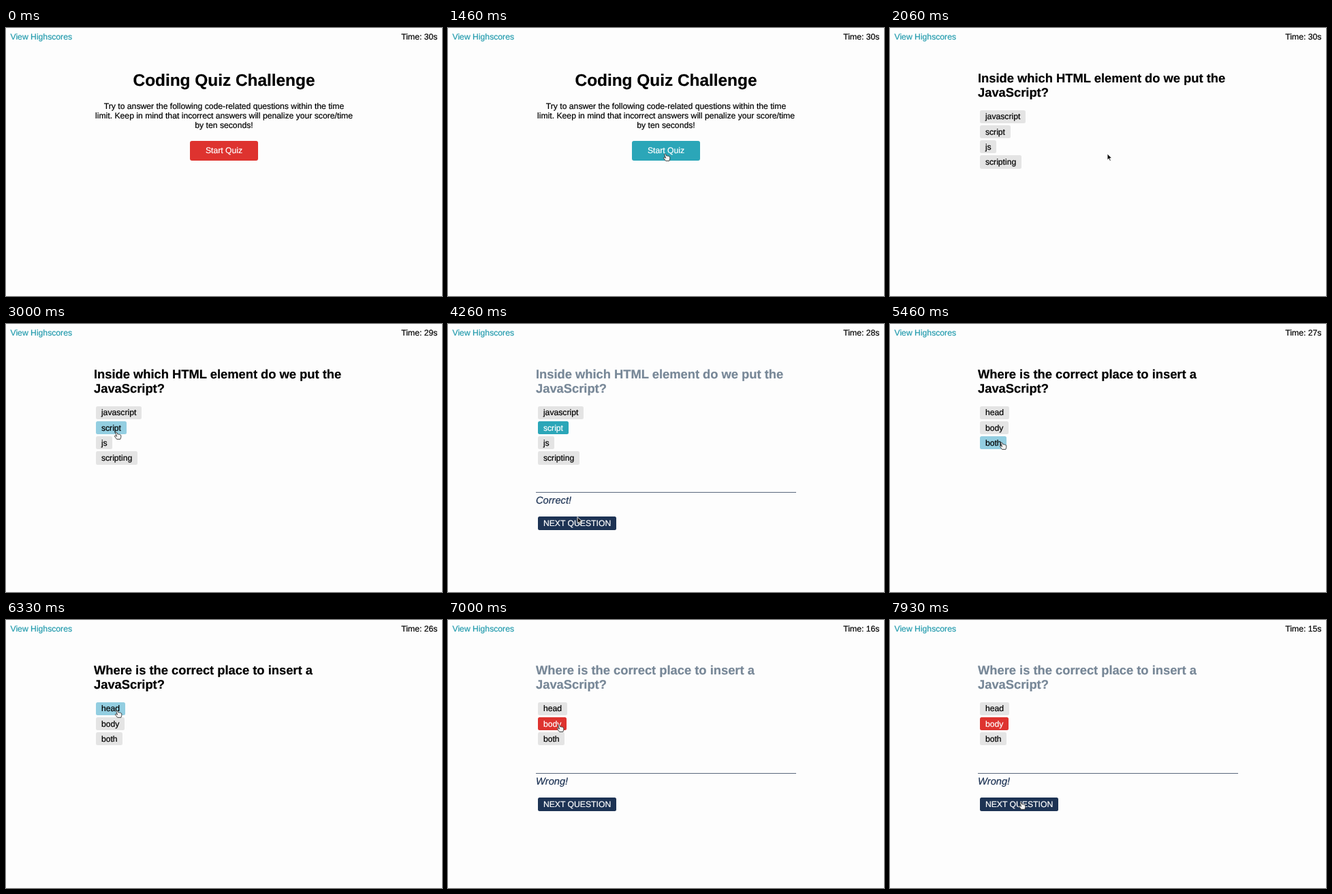
Write an HTML page that moves like this. It is 640x394 px and loops after 8 s.

```html
<!DOCTYPE html>
<html lang="en">
<head>
<meta charset="utf-8">
<title>Coding Quiz Challenge</title>
<style>
:root { --teal: #2ba6b8; --red: #de332f; --navy: #1d3354; --hover: #93cee1; }
html, body { margin: 0; width: 100%; height: 100%; overflow: hidden; }
body {
  position: relative; background: #fdfdfd; color: #000;
  font: 12.2px/14px "Liberation Sans", Arial, sans-serif; white-space: nowrap;
  text-rendering: geometricPrecision; -webkit-text-stroke: .22px;
}
/* every animation shares one 8 s clock and switches hard unless told otherwise */
.anim { animation: 8s step-end infinite; }
.scene, .link, .timer, .cursor, h1, h2, .intro, .start, .options, .feedback { position: absolute; margin: 0; }
.scene { inset: 0; }
.link, .timer { top: 6px; transform: translateY(.4px); }
.link { left: 6.5px; color: #259cae; }
.timer { left: 580.3px; height: 14px; overflow: hidden; }
.timer div { animation-name: countdown; }

h1 { left: 0; width: 640px; top: 64px; font-size: 24.4px; line-height: 27px; text-align: center; }
.intro { left: 0; width: 640px; top: 108px; text-align: center; }
.start {
  left: 270px; top: 165.6px; width: 100px; height: 29px; line-height: 29px; border-radius: 3px;
  text-align: center; color: #fff; background: var(--red); animation-name: start-hover;
}
h2 { left: 129px; top: 63px; font-size: 18.34px; line-height: 21px; }
.options { left: 132.3px; top: 120.8px; }
.btn { display: block; width: max-content; padding: 2.6px 7.6px; margin-bottom: 3px; border-radius: 2.5px; background: #e4e4e4; }
.feedback { left: 129px; top: 247px; width: 382px; border-top: 1px solid #59677c; color: var(--navy); }
.feedback i { display: block; margin: 4.4px 0 14px; font-size: 14.64px; line-height: 17px; }
.feedback .btn { margin-left: 3.3px; color: #fff; background: var(--navy); }
#second .feedback { top: 225px; }

#intro { animation-name: intro; }
#first, #second, .feedback { opacity: 0; }
#first { animation-name: first; }
#second { animation-name: second; }
#first h2 { animation-name: first-dim; }
#second h2 { animation-name: second-dim; }
#first .feedback { animation-name: first-answer; }
#second .feedback { animation-name: second-answer; }
.script { animation-name: script; }
.head { animation-name: head; }
.body { animation-name: body; }
.both { animation-name: both; }

.cursor { left: 0; top: 0; width: 16px; height: 18px; overflow: visible; --hand: 0; opacity: 0;
  animation: path 8s ease-in-out infinite, hand 8s step-end infinite, appear 8s step-end infinite; }
.cursor path { stroke-linejoin: round; stroke-linecap: round; }
.arrow { opacity: calc(1 - var(--hand)); fill: #111; stroke: #fff; stroke-width: .9; }
.pointer { opacity: var(--hand); fill: #f2f2f2; stroke: #333; stroke-width: .9; }

@keyframes intro { 23.4%, 100% { opacity: 0; } }
@keyframes first { 23.4% { opacity: 1; } 55.9% { opacity: 0; } }
@keyframes second { 55.9%, 100% { opacity: 1; } }
@keyframes first-dim { 45%, 100% { color: #778797; } }
@keyframes second-dim { 83.75%, 100% { color: #778797; } }
@keyframes first-answer { 45%, 100% { opacity: 1; } }
@keyframes second-answer { 83.75%, 100% { opacity: 1; } }
@keyframes start-hover { 15.3%, 100% { background: var(--teal); } }
@keyframes script {
  34.75% { background: var(--hover); }
  45%, 100% { background: var(--teal); color: #fff; }
}
@keyframes both { 64.8% { background: var(--hover); } 70.3% { background: #e4e4e4; } }
@keyframes head { 72.4% { background: var(--hover); } 80.6% { background: #e4e4e4; } }
@keyframes body {
  70.6% { background: var(--hover); }
  72.1% { background: #e4e4e4; }
  81% { background: var(--hover); }
  83.75%, 100% { background: var(--red); color: #fff; }
}
@keyframes countdown {
  0% { transform: none; }
  35.6% { transform: translateY(-14px); }
  48.4% { transform: translateY(-28px); }
  64.6% { transform: translateY(-42px); }
  76.9% { transform: translateY(-56px); }
  83.75% { transform: translateY(-70px); }
  89.4%, 100% { transform: translateY(-84px); }
}
@keyframes appear { 12.5%, 100% { opacity: 1; } }
@keyframes path {
  0%, 12.5% { transform: translate(369px, 231px); }
  16.6%, 28.75% { transform: translate(319px, 185px); }
  36.25%, 46.5% { transform: translate(162px, 159px); }
  52.25%, 56% { transform: translate(190px, 284px); }
  58.5%, 60.75% { transform: translate(188px, 287px); }
  65.4%, 68.75% { transform: translate(164px, 174px); }
  73.75%, 80% { transform: translate(163px, 133px); }
  82%, 88.75% { transform: translate(163px, 154px); }
  95.6%, 100% { transform: translate(192px, 268px); }
}
@keyframes hand {
  0% { --hand: 0; }
  15.3% { --hand: 1; }
  23.4% { --hand: 0; }
  34.75% { --hand: 1; }
  47.5% { --hand: 0; }
  54% { --hand: 1; }
  55.9% { --hand: 0; }
  64.8% { --hand: 1; }
  90% { --hand: 0; }
  95%, 100% { --hand: 1; }
}
</style>
</head>
<body>
<div class="link">View Highscores</div>
<div class="timer"><div class="anim">Time: 30s<br>Time: 29s<br>Time: 28s<br>Time: 27s<br>Time: 26s<br>Time: 16s<br>Time: 15s</div></div>

<section class="scene anim" id="intro">
  <h1>Coding Quiz Challenge</h1>
  <p class="intro">Try to answer the following code-related questions within the time<br>limit. Keep in mind that incorrect answers will penalize your score/time<br>by ten seconds!</p>
  <div class="start anim">Start Quiz</div>
</section>

<section class="scene anim" id="first">
  <h2 class="anim">Inside which HTML element do we put the<br>JavaScript?</h2>
  <div class="options">
    <span class="btn">javascript</span>
    <span class="btn anim script">script</span>
    <span class="btn">js</span>
    <span class="btn">scripting</span>
  </div>
  <div class="feedback anim"><i>Correct!</i><span class="btn">NEXT QUESTION</span></div>
</section>

<section class="scene anim" id="second">
  <h2 class="anim">Where is the correct place to insert a<br>JavaScript?</h2>
  <div class="options">
    <span class="btn anim head">head</span>
    <span class="btn anim body">body</span>
    <span class="btn anim both">both</span>
  </div>
  <div class="feedback anim"><i>Wrong!</i><span class="btn">NEXT QUESTION</span></div>
</section>

<svg class="cursor" viewBox="0 0 16 18">
  <path class="arrow" d="M0 0V9.2L2.2 7.2L3.8 10.8L5.3 10.1L3.8 6.6H6.6Z"/>
  <path class="pointer" d="M-1.2 .6Q-.2-.4 .8 .7L1.6 3Q3 2.4 3.6 3.3Q5 2.8 5.6 3.9Q6.8 3.8 6.8 5.2V7.4L5.8 10.4H.6L-2.6 6.2Q-2.6 4.8-1.2 5.2L.2 6Z"/>
</svg>
</body>
</html>
```
